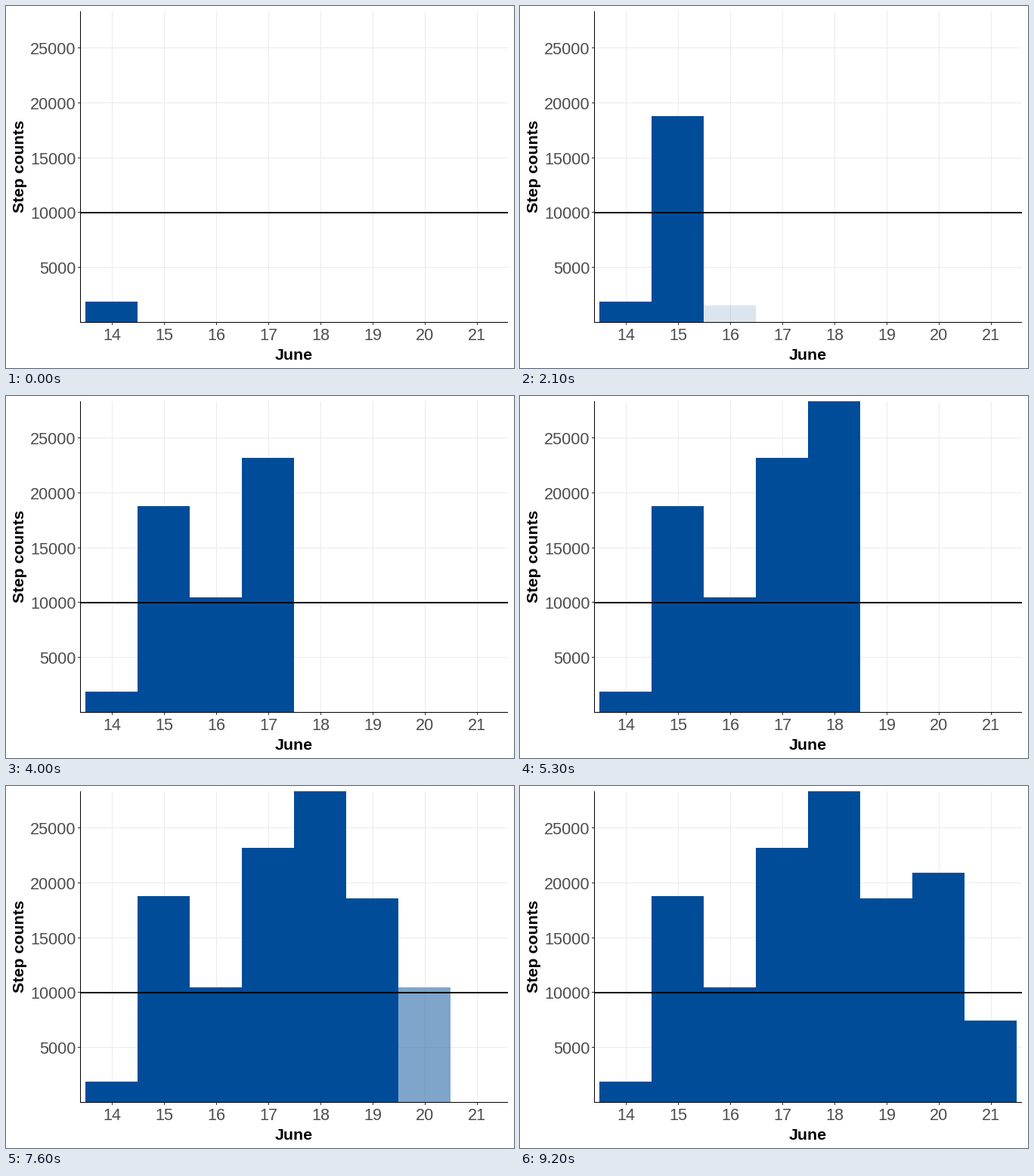
Recreate the animation shown at these times as a matplotlib script. Size 672 by 480 pixels, loop 10000 ms.

```python
import matplotlib.pyplot as plt
from matplotlib.animation import FuncAnimation
from matplotlib.patches import Rectangle

plt.rcParams["font.family"] = "Liberation Sans"

W, H, DPI = 672, 480, 96
LEFT, RIGHT, TOP, BASE = 98, 664, 7, 419
DAY, FIRST = 69, 105              # bar width and left edge of the first bar
FRAMES, STEP = 100, 100           # frame count, ms per frame

BLUE, GRID, TICK, LABEL = "#004C99", "#EBEBEB", "#333333", "#4D4D4D"

# (top of bar, first frame of growth, number of growth steps)
BARS = [(392, 0, 1), (146, 7, 7), (267, 21, 7), (82, 35, 6),
        (7, 48, 6), (149, 61, 6), (115, 74, 6), (311, 87, 6)]

fig = plt.figure(figsize=(W / DPI, H / DPI), dpi=DPI, facecolor="white")
ax = fig.add_axes([0, 0, 1, 1])
ax.set(xlim=(0, W), ylim=(H, 0))
ax.axis("off")


def box(x, y, w, h, color, z):
    return ax.add_patch(Rectangle((x, y), w, h, facecolor=color, linewidth=0,
                                  antialiased=False, zorder=z))


def label(x, y, text, ha="center", size=16.2, color=LABEL, **kw):
    ax.text(x, y, text, ha=ha, va="baseline", fontsize=size, color=color, **kw)


# Horizontal grid, ticks and labels
for steps in range(5000, 25001, 5000):
    y = int(419.25 - steps * 72.75 / 5000)
    box(LEFT, y, RIGHT - LEFT, 1, GRID, 1)
    box(LEFT - 3, y, 3, 1, TICK, 4)
    label(92.5, y + 9, str(steps), ha="right")

# Vertical grid, ticks and labels
for i in range(len(BARS)):
    x = FIRST + 35 + i * DAY
    box(x, TOP, 1, BASE - TOP, GRID, 1)
    box(x, BASE + 1, 1, 3, TICK, 4)
    label(x, 443, str(14 + i))

# Daily goal and axes
box(LEFT, 273, RIGHT - LEFT, 2, "black", 3)
box(LEFT, TOP, 1, BASE + 1 - TOP, "black", 5)
box(LEFT, BASE, RIGHT - LEFT, 1, "black", 5)

title = dict(size=16, color="black", weight="bold")
label(381, 469, "June", **title)
label(24, 213, "Step counts", rotation=90, rotation_mode="anchor", **title)

bars = [box(FIRST + i * DAY, BASE, DAY, 0, BLUE, 2) for i in range(len(BARS))]


def update(frame):
    """Each bar grows and fades in linearly, then stays."""
    for bar, (top, start, steps) in zip(bars, BARS):
        k = min(max((frame - start + 1) / steps, 0), 1)
        height = round((BASE - top) * k)
        bar.set_y(BASE - height)
        bar.set_height(height)
        bar.set_alpha(k)
        bar.set_visible(k > 0)
    return bars


anim = FuncAnimation(fig, update, frames=FRAMES, interval=STEP,
                     repeat=True, repeat_delay=0, blit=False)
plt.show()
```
